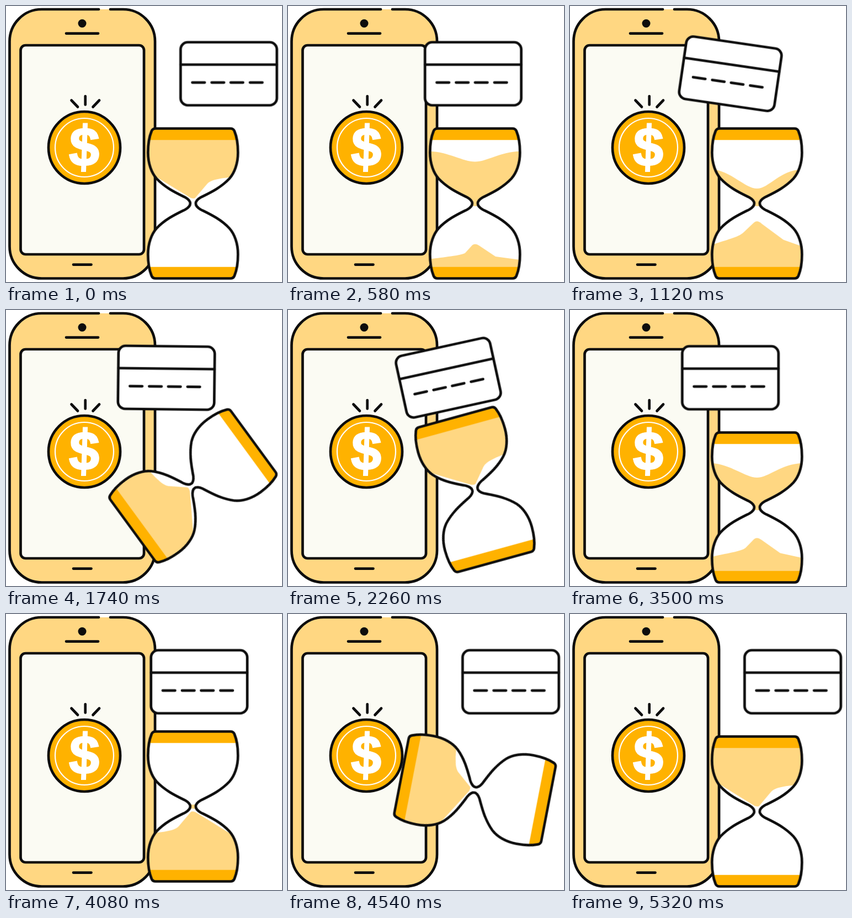
Recreate the animation shown at these times as an HTML page without scripts. Size 500 by 499 pixels, loop 5360 ms.

```html
<!DOCTYPE html>
<html lang="en">
<head>
<meta charset="utf-8">
<title>Time and money</title>
<style>
html, body { margin: 0; width: 100%; height: 100%; overflow: hidden; background: #fff; }
svg { display: block; width: 100%; height: 100%; }
.ink { stroke: #0d0d0d; stroke-width: 4.7; stroke-linecap: round; stroke-linejoin: round; }
.none { fill: none; }
.white { fill: #fff; }
.sand { fill: #ffd782; }
.gold { fill: #ffb200; }
.sign { font: 700 99px "Liberation Sans", Arial, sans-serif; text-anchor: middle; stroke: #fff; stroke-width: 2.4; }

.slide, .tilt, .lift, .turn { animation: 5360ms infinite; }
.slide, .tilt, .lift { animation-timing-function: cubic-bezier(.33, 0, .67, 1); }
.slide { animation-name: slide; }
.tilt { animation-name: tilt; }
.lift { animation-name: lift; }
.turn { animation-name: turn; animation-timing-function: cubic-bezier(.15, .15, .4, 1); }
.upper { animation: drain 2680ms linear infinite; }
.lower { animation: pile 2680ms linear infinite; }

@keyframes slide {
  0%, .75% { transform: translate(403.5px, 122.5px); }
  18.47%, 66.98% { transform: translate(290.5px, 122.5px); }
  84.7%, 100% { transform: translate(403.5px, 122.5px); }
}
@keyframes tilt {
  0%, 16.04% { transform: rotate(0deg); }
  27.05% { transform: rotate(20deg); }
  38.15% { transform: rotate(-20deg); }
  52.61% { transform: rotate(20deg); }
  65.11%, 100% { transform: rotate(0deg); }
}
@keyframes lift {
  0% { transform: translate(338.7px, 357px); }
  22.95% { transform: translate(338.7px, 357px); animation-timing-function: linear; }
  32.46%, 39.55% { transform: translate(338.7px, 318px); }
  49.63% { transform: translate(338.7px, 357px); }
  73.88% { transform: translate(338.7px, 357px); animation-timing-function: linear; }
  83.58%, 89.18% { transform: translate(338.7px, 318px); }
  98.88%, 100% { transform: translate(338.7px, 357px); }
}
@keyframes turn {
  0%, 29.1% { transform: rotate(0deg); }
  48.13%, 49.99% { transform: rotate(180deg); }
  50%, 78.36% { transform: rotate(0deg); }
  97.39%, 100% { transform: rotate(180deg); }
}
@keyframes drain {
  0% { d: path("M-85 -115C-50 -115 -22 -115 0 -115C22 -115 50 -115 85 -115L85 -50C60 -46 36 -46 26 -36L4 -10Q2 -8 -4 -10L-40 -32L-85 -60Z"); }
  8.21% { d: path("M-85 -116C-50 -116 -22 -108 0 -108C22 -108 50 -116 85 -116L85 0C60 0 36 0 26 0L4 4Q2 6 -4 4L-40 0L-85 0Z"); }
  41.79% { d: path("M-85 -62C-50 -62 -22 -27 0 -27C22 -27 42 -62 85 -62L85 0C60 0 36 0 26 0L4 4Q2 6 -4 4L-40 0L-85 0Z"); }
  51.49% { d: path("M-85 -22C-50 -16 -22 -4 0 -4C22 -4 50 -16 85 -22L85 0C60 0 36 0 26 0L4 4Q2 6 -4 4L-40 0L-85 0Z"); }
  56%, 100% { d: path("M-85 0C-50 0 -22 0 0 0C22 0 50 0 85 0L85 0C60 0 36 0 26 0L4 0Q2 0 -4 0L-40 0L-85 0Z"); }
}
@keyframes pile {
  0% { d: path("M85 118L85 118L30 118L6 117Q0 117 -4 117L-14 118C-20 118 -60 118 -85 118L-85 118Z"); }
  8.21% { d: path("M85 118L85 118L30 116L6 102Q0 100 -4 102L-14 115C-20 116 -60 118 -85 118L-85 118Z"); }
  41.79% { d: path("M85 118L85 79L48 66L9 37Q0 29 -6 35L-24 52C-34 62 -58 66 -85 76L-85 118Z"); }
  51.49%, 100% { d: path("M85 118L85 60L40 32L4 10Q-2 8 -4 10L-26 36C-36 46 -60 46 -85 50L-85 118Z"); }
}
</style>
</head>
<body>
<svg viewBox="0 0 500 499">
  <defs>
    <path id="glass" d="M-68 -135.5H68Q73 -135.5 75 -131C80 -119 81.5 -105 81.5 -92C81.5 -72 75 -55 66 -45C50 -28 30 -19 14 -11C7 -7 5 -4 5 0C5 4 7 7 14 11C30 19 50 28 66 45C75 55 81.5 72 81.5 92C81.5 105 80 119 75 131Q73 135.5 68 135.5H-68Q-73 135.5 -75 131C-80 119 -81.5 105 -81.5 92C-81.5 72 -75 55 -66 45C-50 28 -30 19 -14 11C-7 7 -5 4 -5 0C-5 -4 -7 -7 -14 -11C-30 -19 -50 -28 -66 -45C-75 -55 -81.5 -72 -81.5 -92C-81.5 -105 -80 -119 -75 -131Q-73 -135.5 -68 -135.5Z"/>
    <clipPath id="inside"><use href="#glass"/></clipPath>
  </defs>

  <g class="ink">
    <rect class="sand" x="6.5" y="6" width="263.5" height="486.5" rx="58" stroke="none"/>
    <path class="none" d="M189 6H212A58 58 0 0 1 270 64V434.5A58 58 0 0 1 212 492.5H64.5A58 58 0 0 1 6.5 434.5V64A58 58 0 0 1 64.5 6H168"/>
    <rect x="26.5" y="71" width="223.5" height="378" rx="9" fill="#fbfbf3"/>
    <circle cx="138" cy="31.5" r="7.5" fill="#0d0d0d" stroke="none"/>
    <path d="M109 49.6H167M122 467.6H154.5"/>
    <path d="M118.5 170.5L130 182.5M143.7 163V178.5M169 170.5L157.5 182.5"/>
    <circle class="gold" cx="142" cy="256" r="65"/>
  </g>
  <circle class="none" cx="142" cy="256" r="53" stroke="#fff" stroke-width="2.2"/>
  <g transform="translate(142 256) skewX(-2)">
    <text class="sign white" y="33">$</text>
    <path d="M0 -44.5V44" stroke="#fff" stroke-width="9"/>
  </g>

  <g class="slide"><g class="tilt ink">
    <rect class="white" x="-87.2" y="-57" width="174.4" height="114" rx="13"/>
    <path d="M-87 -16.5H87M-66 15.8H-43.5M-31 15.8H-8.5M3.5 15.8H26M38.5 15.8H61"/>
  </g></g>

  <g class="lift"><g class="turn">
    <use class="white" href="#glass"/>
    <g clip-path="url(#inside)">
      <path class="sand upper" d="M0 0"/>
      <path class="sand lower" d="M0 0"/>
      <path class="gold" d="M-85 -138H85V-114.8H-85ZM-85 138H85V114.8H-85Z"/>
    </g>
    <use class="ink none" href="#glass"/>
  </g></g>
</svg>
</body>
</html>
```
